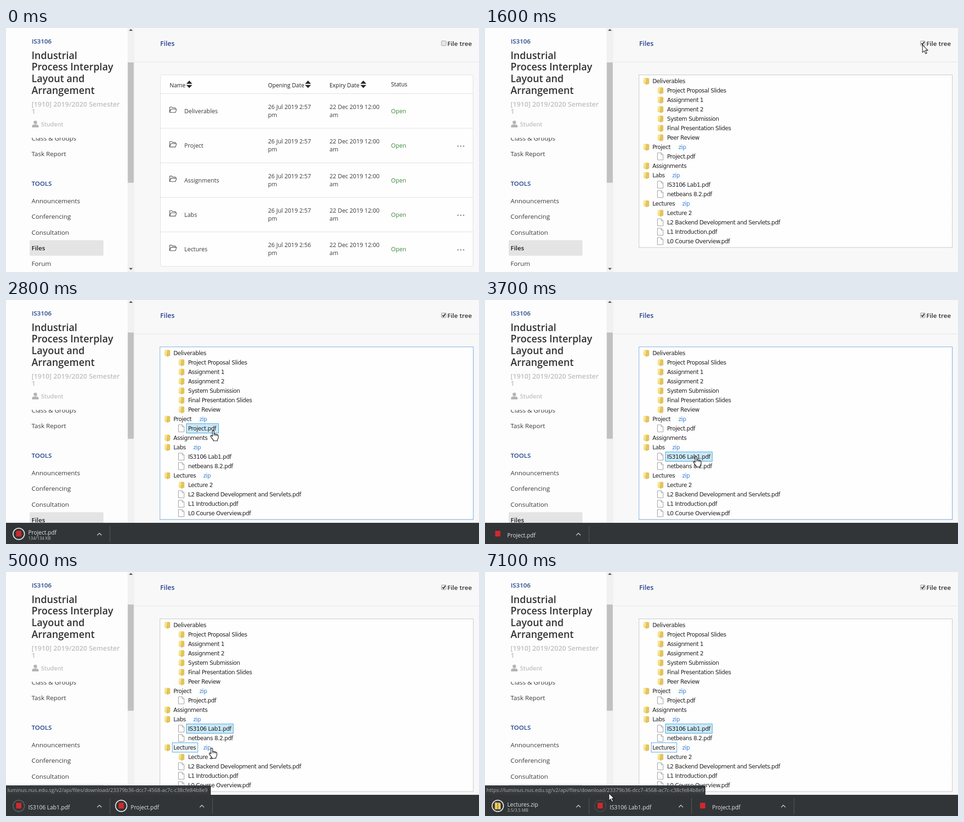
These frames come from a looping animation (1000 px wide and 518 px high, 7.2 s). An HTML page:

```html
<!DOCTYPE html>
<html lang="en">
<head>
<meta charset="utf-8">
<title>File tree downloads</title>
<style>
html, body { margin: 0; width: 100%; height: 100%; overflow: hidden; background: #f8f8f9; }
svg { display: block; width: 100%; height: 100%; }
text { font-family: "Open Sans", "Noto Sans", sans-serif; white-space: pre; }
.tree text { font-family: "DejaVu Sans", sans-serif; font-size: 12px; letter-spacing: -.45px; }
</style>
</head>
<body>
<svg id="stage" viewBox="0 0 1000 518" xmlns="http://www.w3.org/2000/svg">
  <defs>
    <linearGradient id="gold" x2="1" y2="1"><stop offset="0" stop-color="#fbf0b4"/><stop offset=".6" stop-color="#f3dc82"/><stop offset="1" stop-color="#e3bf4c"/></linearGradient>
    <clipPath id="menuClip"><rect y="233" width="257" height="285"/></clipPath>
    <g id="folder">
      <path d="M5 1.5H11.5L12.5 3V13.5L6 15Z" fill="#e8c65a"/>
      <path d="M.8 2L5 .8L7.6 3.4V15.6L.8 13.2Z" fill="url(#gold)"/>
      <path d="M7.6 3.4V15.6L12.5 13.6V3" fill="none" stroke="#cfa93c" stroke-width=".7"/>
    </g>
    <g id="page">
      <path d="M.5 .5H8.5L12.5 4.5V15.5H.5Z" fill="#fdfdfd" stroke="#969696"/>
      <path d="M8.5 .5V4.5H12.5" fill="#e6e6e6" stroke="#969696"/>
    </g>
    <path id="openFolder" d="M1 12V1.5Q1 .7 2 .7H5.5L7 2.5H13V5M1 12.3L3.5 5.2H15.5L13.3 12.3Z" fill="none" stroke="#444" stroke-width="1.1" stroke-linejoin="round"/>
    <path id="sort" d="M-6.3 -1L0 -8L6.3 -1ZM-6.3 1.5L0 8L6.3 1.5Z" fill="#262a2e"/>
    <path id="arrow" d="M0 0V15.8L3.7 12.4L6.4 18.6L9 17.4L6.3 11.4H11.2Z" fill="#fff" stroke="#111" stroke-width="1.1"/>
    <g id="hand" stroke="#111" stroke-width="1.2" stroke-linejoin="round" fill="#fff">
      <path d="M-1.7 .6Q0 -2.4 1.8 .6V6.6Q3.6 5.2 5 7.2Q6.8 6 8 8Q10.6 7.4 10.8 10V14.5Q10.4 17 8.8 18.6V21H.2V19Q-3.2 15.4 -5.3 11.5Q-5.6 9 -3.6 9.6L-1.7 11.6Z"/>
      <path d="M1.8 6.6V10M5 7.2V10.4M8 8V10.8" fill="none"/>
    </g>
    <rect id="pdf" x="-5.5" y="-6.5" width="11" height="12" rx="1" fill="#d3282c"/>
    <g id="zip">
      <path d="M-6 -7H3L6 -5V7H-6Z" fill="#efcf62"/>
      <path d="M0 -7V7" stroke="#7d6b35" stroke-width="2.4" stroke-dasharray="1.5 1"/>
      <path d="M-6 -7V7H6" fill="none" stroke="#c59e35"/>
    </g>
  </defs>
  <g id="side"></g>
  <g id="head"></g>
  <g id="table"></g>
  <g id="tree" class="tree"></g>
  <g id="bubble"></g>
  <g id="shelf"></g>
  <use id="cursor"/>
</svg>
<script>
const LOOP = 7200, STEP = 100;
const CHECK = 1400, TREE = 1500, SHELF = 2500, LAB = 3900, BLUR = 4500, LECTURES = 5600;
const NAVY = '#27448c', INK = '#3a3a3c';
const $ = id => document.getElementById(id);

const text = (x, y, s, size, fill = INK, weight = 400, extra = '') =>
  `<text x="${x}" y="${y}" font-size="${size}" fill="${fill}" font-weight="${weight}" ${extra}>${s}</text>`;
const rect = (x, y, w, h, fill, extra = '') =>
  `<rect x="${x}" y="${y}" width="${w}" height="${h}" fill="${fill}" ${extra}/>`;
const path = (d, stroke, extra = '') => `<path d="${d}" fill="none" stroke="${stroke}" ${extra}/>`;
const use = (id, x, y) => `<use href="#${id}" x="${x}" y="${y}"/>`;
const clamp = v => Math.max(0, Math.min(1, v));

function buildSide() {
  const title = ['Industrial', 'Process Interplay', 'Layout and', 'Arrangement'];
  const menu = ['Announcements', 'Conferencing', 'Consultation', 'Files', 'Forum'];
  const grey = '#bfbfc1';
  return rect(0, 0, 257, 518, '#fdfdfd') + rect(257, 0, 14.5, 518, '#f1f1f2') +
    text(54.5, 33, 'IS3106', 13.3, NAVY, 600) +
    title.map((s, i) => text(54, 65.5 + i * 24.7, s, 20.8, '#333', 600)).join('') +
    text(54, 166.5, '[1910] 2019/2020 Semester', 14.4, grey, 600) +
    text(54, 181.5, '1', 14.4, grey, 600) +
    '<circle cx="62" cy="200.5" r="3.7" fill="#b4b4b6"/>' +
    '<path d="M55 211V209Q55 205 59 205H65Q69 205 69 209V211Z" fill="#b4b4b6"/>' +
    text(74, 208.5, 'Student', 12.4, grey, 600) +
    text(54, 239, 'Class &amp; Groups', 13.4, INK, 400, 'clip-path="url(#menuClip)"') +
    text(54, 272, 'Task Report', 13.4) +
    text(54, 335, 'TOOLS', 13.3, NAVY, 600) +
    rect(50, 450.5, 156, 33, '#e4e4e5', 'rx="2"') +
    menu.map((s, i) => text(54, 372 + i * 33.35, s, 13.4, s === 'Files' ? '#222' : INK, s === 'Files' ? 600 : 400)).join('') +
    '<path d="M260 6L264 2L268 6ZM260 509.5L264 513.5L268 509.5Z" fill="#505050"/>' +
    '<rect id="thumb" x="257.5" width="12.5" fill="#c1c1c2"/>';
}

function buildHead() {
  return path('M272 72H1000', '#e2e2e5') +
    text(326, 38, 'Files', 14.1, NAVY, 600) +
    rect(920.5, 27.5, 10, 10, '#e6e6e6', 'rx="1" stroke="#9c9c9c"') +
    path('M922.5 32.5L925 35L929 29', '#333', 'id="tick" stroke-width="1.9"') +
    text(933, 38, 'File tree', 13.4, '#333', 600);
}

function buildTable() {
  const names = ['Deliverables', 'Project', 'Assignments', 'Labs', 'Lectures'];
  let out = rect(326.5, 99.5, 661, 406.5, '#fefefe', 'rx="3" stroke="#dededf"');
  for (const [x, y, s] of [[346, 126, 'Name'], [554, 126, 'Opening Date'], [684, 126, 'Expiry Date'], [814, 124, 'Status']])
    out += text(x, y, s, 11.9, '#222');
  out += [387.5, 638.5, 755.5].map(x => use('sort', x, 119.5)).join('');
  names.forEach((name, i) => {
    const y = 139.5 + i * 73.35;
    out += path(`M327 ${y}H987`, '#dededf') + use('openFolder', 345, y + 27.5) +
      text(377, y + 41.5, name, 12.4) +
      text(554, y + 32.5, `26 Jul 2019 2:5${i === 4 ? 6 : 7}`, 12.4) + text(554, y + 49.5, 'pm', 12.4) +
      text(684, y + 32.5, '22 Dec 2019 12:00', 12.4) + text(684, y + 49.5, 'am', 12.4) +
      text(814, y + 41.5, 'Open', 12.5, '#3d8b3a');
    if (i === 1 || i > 2)
      out += [955.5, 961.5, 967.5].map(x => `<circle cx="${x}" cy="${y + 38}" r="1.5" fill="#8c8c90"/>`).join('');
  });
  return out;
}

// Leading dash: folder one level down; leading dot: file; "|x": zip link at x.
const NODES = ['Deliverables', '-Project Proposal Slides', '-Assignment 1', '-Assignment 2', '-System Submission',
  '-Final Presentation Slides', '-Peer Review', 'Project|409', '.Project.pdf', 'Assignments', 'Labs|396',
  '.IS3106 Lab1.pdf', '.netbeans 8.2.pdf', 'Lectures|417', '-Lecture 2',
  '.L2 Backend Development and Servlets.pdf', '.L1 Introduction.pdf', '.L0 Course Overview.pdf'];

function drawTree(t) {
  const focused = t >= 2300 && t < BLUR;
  const frame = (fill, extra) => rect(325.5, 99.5, 662.5, 366.5, fill, extra);
  let out = frame('#fefefe', focused ? 'stroke="#94c0f2"' : '') +
    frame('none', `stroke="${focused ? '#5d93d6' : '#8a8a8a'}" stroke-dasharray="1 1"`);
  const box = (x, row, w, fill, line) => rect(x + .5, 102.5 + row * 20, w, 20, fill, `stroke="${line}"`);
  const active = ['#cbe8f6', '#3fa4da'], hover = ['#e9f5fb', '#70c0e7'];
  if (t >= 2200 && t < 3700) out += box(381, 8, 68, ...(t >= 2300 ? active : hover));
  if (t >= 3600) out += box(381, 11, 99, ...(t >= 3700 ? active : hover));
  if (t >= 4200) out += box(351, 13, 54, t < 6600 ? '#f1f8fd' : '#fefefe', t < BLUR ? '#70c0e7' : '#4fa3dc');
  NODES.forEach((node, i) => {
    const y = 117 + i * 20, deep = '-.'.includes(node[0]);
    const [label, zip] = node.replace(/^[-.]/, '').split('|');
    out += use(node[0] === '.' ? 'page' : 'folder', deep ? 364 : 334, y - 12.5) +
      text(deep ? 385 : 354, y, label, 12, '#222');
    if (zip) {
      out += text(zip, y - .5, 'zip', 12, '#3a7fd0');
      if (i === 13 && t >= 4200 && t < BLUR) out += path(`M${zip} ${y + 1.5}h16`, '#3a7fd0');
    }
  });
  return out;
}

function drawBubble(t) {
  if (t < 4700) return '';
  const secure = t >= 5700, w = secure ? 466 : 433;
  const url = (secure ? 'https://' : '') + 'luminus.nus.edu.sg/v2/api/files/download/23379b36-dcc7-4568-ac7c-c38cfe84b8e9';
  return `<path d="M0 453H${w - 3}Q${w} 453 ${w} 456V474H0Z" fill="#35393c"/>` + text(3, 467, url, 10.93, '#adb0b2');
}

function ring(x, p, color) {
  const a = 2 * Math.PI * p, r = 12;
  if (p >= 1) return `<circle cx="${x}" cy="496.5" r="${r}" fill="none" stroke="${color}" stroke-width="2"/>`;
  return path(`M${x} ${496.5 - r}A${r} ${r} 0 ${p > .5 ? 1 : 0} 1 ${x + r * Math.sin(a)} ${496.5 - r * Math.cos(a)}`, color, 'stroke-width="2"');
}

function drawItem(slot, { name, icon, note, p, color }) {
  const x = slot * 216.6;
  let out = '';
  if (color) out += ring(x + 27, 1, '#505357') + ring(x + 27, p, color);
  out += use(icon, x + 27, 496.5) + text(x + 47, note ? 498 : 503.5, name, 11.8, '#e4e5e6');
  if (note) out += text(x + 47, 509, note, 8.95, '#bfc1c3');
  return out + path(`M${x + 193} 499.5L${x + 197.5} 495L${x + 202} 499.5`, '#d0d2d3', 'stroke-width="1.5"') +
    path(`M${x + 220} 480V514`, '#5b5e61');
}

function drawShelf(t) {
  if (t < SHELF) return '';
  const white = '#dfe0e1', dim = '#55585b', items = [];
  if (t >= LECTURES) {
    const p = clamp((t - 5700) / 1167);
    items.push({ name: 'Lectures.zip', icon: 'zip', p, color: white,
      note: `${p ? (3.5 * p).toFixed(1) : 0}/3.5 MB` + (p < 1 ? `, ${Math.ceil((1 - p) * 4)} secs left` : '') });
  }
  if (t >= LAB) {
    const p = clamp((t - LAB) / 614), kb = Math.round(1680 * p).toLocaleString('en-US');
    items.push({ name: 'IS3106 Lab1.pdf', icon: 'pdf', p, color: t < 4900 ? white : t < LECTURES ? dim : '#3f4346',
      note: t < 4900 && `${kb}/1,680 KB` + (p < 1 ? ', 0 secs left' : '') });
  }
  const p = clamp((t - SHELF) / 100), fresh = t < 3300;
  items.push({ name: 'Project.pdf', icon: 'pdf', p,
    color: fresh || (t >= 4900 && t < 5200) ? white : null,
    note: fresh && `${Math.round(134 * p)}/134 KB` });
  return rect(0, 473, 1000, 45, '#313538') + items.map((item, i) => drawItem(i, item)).join('');
}

const PATH = [[400, 976, 12], [1100, 925, 36], [1700, 925, 36], [2100, 470, 258], [2300, 438, 278], [3300, 438, 278],
  [3700, 446, 333], [3900, 446, 333], [4300, 436, 371], [4400, 436, 371], [4700, 435, 374.5], [6500, 435, 374.5], [7100, 262, 469.5]];

function cursorAt(t) {
  const i = PATH.findIndex(k => k[0] > t);
  if (i < 0) return PATH[PATH.length - 1].slice(1);
  const [t0, x0, y0] = PATH[i - 1], [t1, x1, y1] = PATH[i];
  const u = (t - t0) / (t1 - t0), e = u * u * (3 - 2 * u);
  return [x0 + (x1 - x0) * e, y0 + (y1 - y0) * e];
}

const show = (id, on) => $(id).setAttribute('visibility', on ? 'visible' : 'hidden');

function draw(t) {
  const docked = t >= SHELF;
  $('thumb').setAttribute('y', docked ? 69 : 73);
  $('thumb').setAttribute('height', docked ? 225.5 : 255.5);
  show('tick', t >= CHECK);
  show('table', t < TREE);
  $('tree').innerHTML = t >= TREE ? drawTree(t) : '';
  $('bubble').innerHTML = drawBubble(t);
  $('shelf').innerHTML = drawShelf(t);
  show('cursor', t >= 400);
  if (t >= 400) {
    const [x, y] = cursorAt(t);
    $('cursor').setAttribute('href', t >= 2200 && t < 6600 ? '#hand' : '#arrow');
    $('cursor').setAttribute('transform', `translate(${x} ${y})`);
  }
}

$('side').innerHTML = buildSide();
$('head').innerHTML = buildHead();
$('table').innerHTML = buildTable();

const start = performance.now();
let last = -1;
function tick() {
  const t = Math.floor(((performance.now() - start) % LOOP) / STEP) * STEP;
  if (t !== last) draw(last = t);
  requestAnimationFrame(tick);
}
tick();
</script>
</body>
</html>
```
